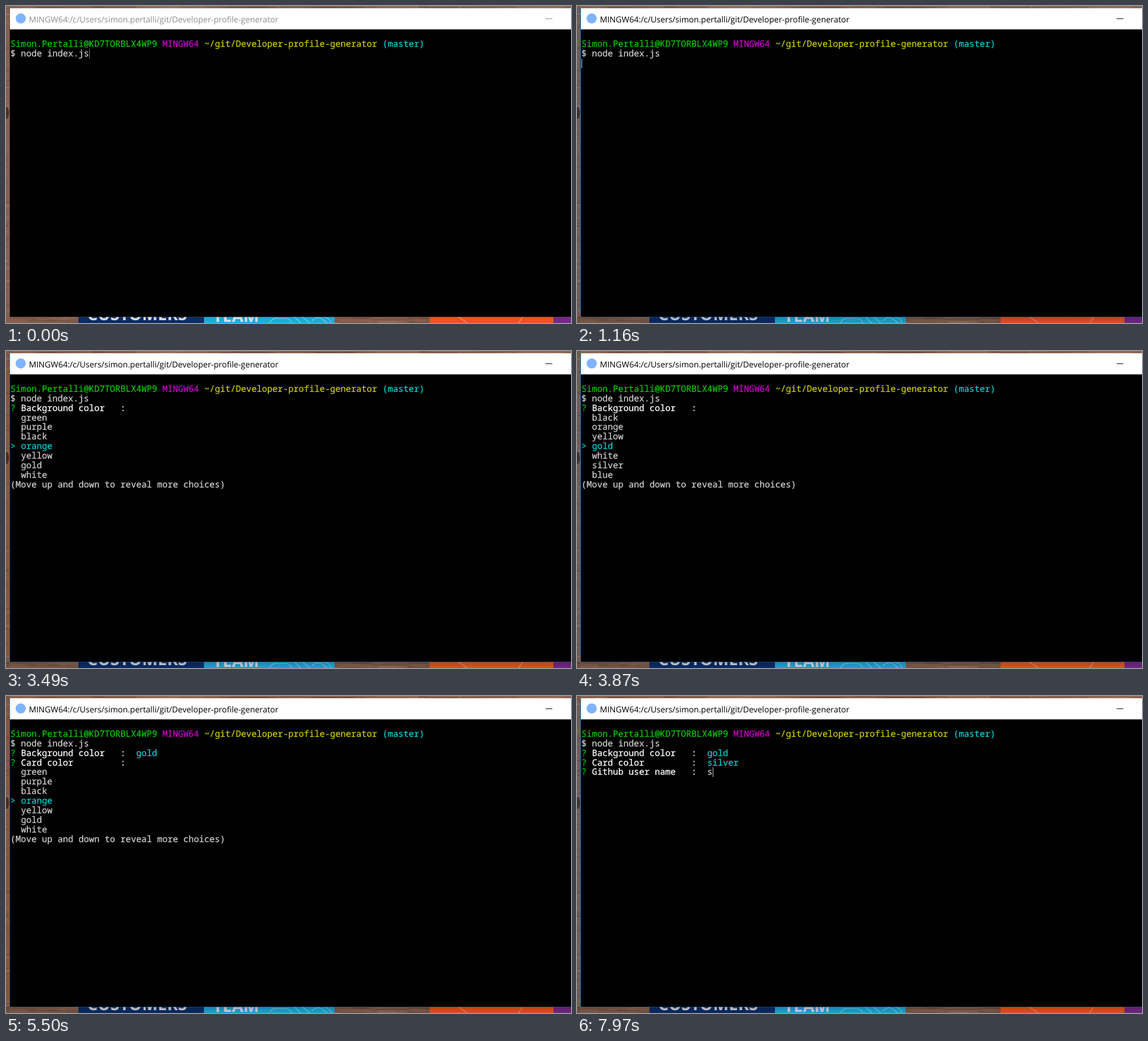
An HTML page for the animation above (8000 ms loop, 999 by 560 pixels).

```html
<!DOCTYPE html>
<html lang="en">
<head>
<meta charset="utf-8">
<title>Terminal session</title>
<style>
  html, body { margin: 0; width: 100%; height: 100%; overflow: hidden; background: #8a6250; }
  svg { display: block; width: 999px; height: 560px; }
  text { white-space: pre; text-rendering: geometricPrecision; }
  .title { font: 14.46px "Open Sans", sans-serif; }
  .poster { font: bold 29.4px "Open Sans", sans-serif; fill: #dfe6f6; }
  #screen { font: 15.44px "Noto Sans Mono", monospace; stroke-width: .3px; }
</style>
</head>
<body>
<svg viewBox="0 0 999 560">
  <defs>
    <linearGradient id="shade" x1="0" y1="0" x2="0" y2="1">
      <stop offset="0" stop-color="#000" stop-opacity=".24"/>
      <stop offset="1" stop-color="#000" stop-opacity=".1"/>
    </linearGradient>
  </defs>

  <rect width="999" height="560" fill="#8a6350"/>
  <g id="wood"></g>
  <ellipse cx="1" cy="189" rx="4" ry="11" fill="#2e1b14" opacity=".65"/>

  <g id="posters">
    <rect x="128" y="540" width="222" height="20" fill="#0b2f6e"/>
    <rect x="350" y="540" width="231" height="20" fill="#22b0e6"/>
    <rect x="749" y="540" width="219" height="20" fill="#f15a22"/>
    <rect x="968" y="540" width="31" height="20" fill="#7b2a90"/>
    <text class="poster" x="143.500" y="555">CUSTOMERS</text>
    <text class="poster" x="366" y="557.500">TEAM</text>
    <g fill="none" stroke="#8fd8f4" stroke-width="1.1">
      <path d="M466 560q4-9 13-8h16q8 1 10 8M510 549l11 11M524 549l13 11M541 556q9-9 18-3l9 7M560 549q12 1 15 11"/>
    </g>
    <g fill="none" stroke="#f58a5e" stroke-width="2">
      <path d="M799 549q8 5 17 11M906 560q5-7 8-11"/>
    </g>
  </g>
  <g id="shadow">
    <rect y="549" width="999" height="11" fill="url(#shade)"/>
    <rect width="6" height="560" fill="#000" opacity=".1"/>
  </g>

  <rect id="frame" x="6" y="4" width="1000" height="545.5"/>
  <rect x="7" y="41" width="992" height="508"/>
  <rect x="7" y="4" width="992" height="37.3" fill="#fff"/>
  <circle cx="26" cy="22" r="9" fill="#80b3ff"/>
  <g id="caption">
    <text class="title" x="40.5" y="28.5">MINGW64:/c/Users/simon.pertalli/git/Developer-profile-generator</text>
    <rect x="954" y="22" width="12" height="1"/>
  </g>

  <g id="screen"></g>
  <path id="pointer" d="M0 .5h4q1 0 1 1.500q0-1.500 1-1.500h4M5 2v17M0 20.500h4q1 0 1-1.500q0 1.500 1 1.500h4"
        fill="none" stroke="#fff"/>
</svg>

<script>
const LOOP = 8000, CELL = 9.266, LINE = 16.87, LEFT = 7.85, TOP = 59;
const FOCUS_AT = 530, ENTER_AT = 1160;
const ink = {
  green: '#00c800', magenta: '#c800c8', yellow: '#c8c800', cyan: '#00cccc',
  gray: '#cccccc', white: '#fff', dim: '#808080'
};
const colors = 'blue red green purple black orange yellow gold white silver'.split(' ');

// The first time opens a list, each later one moves down, "end" confirms.
const lists = [
  { label: 'Background color', keys: [1620, 2630, 2860, 3010, 3240, 3490, 3640, 3870], end: 4250 },
  { label: 'Card color', keys: [4250, 4730, 4960, 5110, 5340, 5500, 5720, 5970, 6430, 6730], end: 7040 }
];
const input = { label: 'Github user name', at: 7040, blink: 7590, type: 7970 };
const path = [[230, 617, 343], [300, 596, 322], [530, 596, 322], [610, 560, 290],
              [690, 508, 245], [770, 464, 206], [850, 445, 189]];

const $ = id => document.getElementById(id);

function put(row, col, str, color) {
  const x = LEFT + col * CELL, y = Math.round(TOP + 13 + row * LINE), c = ink[color];
  return `<text x="${x.toFixed(2)}" y="${y}" fill="${c}" stroke="${c}">${str.replace('>', '&gt;')}</text>`;
}

function caret(row, col, color = 'gray') {
  const x = Math.round(LEFT + col * CELL), y = Math.round(TOP + row * LINE);
  return `<rect x="${x}" y="${y}" width="1" height="17" fill="${ink[color]}"/>`;
}

const question = (row, label) =>
  put(row, 0, '?', 'green') + put(row, 2, label.padEnd(19) + ':', 'white');

function menu(row, pick) {
  const first = Math.max(0, pick - 3);
  let out = '';
  for (let i = 0; i < 7; i++) {
    const n = first + i, on = n === pick;
    if (on) out += put(row + i, 0, '>', 'cyan');
    out += put(row + i, 2, colors[n % colors.length], on ? 'cyan' : 'gray');
  }
  return out + put(row + 7, 0, '(Move up and down to reveal more choices)', 'gray');
}

function screen(t) {
  let out = put(0, 0, 'Simon.Pertalli@KD7TORBLX4WP9', 'green') + put(0, 29, 'MINGW64', 'magenta') +
    put(0, 37, '~/git/Developer-profile-generator', 'yellow') + put(0, 71, '(master)', 'cyan') +
    put(1, 0, '$ node index.js', 'gray');
  if (t < ENTER_AT) return out + caret(1, 15, t < FOCUS_AT ? 'dim' : 'gray');
  if (t < lists[0].keys[0]) return out + caret(2, 0);

  let row = 2;
  for (const { label, keys, end } of lists) {
    if (t < keys[0]) break;
    const pick = keys.filter(k => k <= t).length - 1;
    out += question(row, label);
    if (t >= end) out += put(row, 24, colors[pick], 'cyan');
    else {
      if (pick === 0) out += put(row, 24, '(Use arrow keys)', 'dim');
      out += menu(row + 1, pick);
    }
    row++;
  }
  if (t >= input.at) {
    out += question(row, input.label);
    if (t >= input.type) out += put(row, 24, 's', 'gray') + caret(row, 25);
    else if (t < input.blink) out += caret(row, 24);
  }
  return out;
}

function grain() {
  let seed = 7, out = '';
  const rnd = () => (seed = seed * 16807 % 2147483647) / 2147483647;
  const streak = (x, y, w) => {
    out += `<rect x="${x}" y="${y}" width="${w}" height="${1 + rnd() * 2}"
      fill="${rnd() < .5 ? '#5d3d30' : '#a8836d'}" opacity="${.1 + rnd() * .3}"/>`;
  };
  for (let i = 0; i < 110; i++) streak(0, rnd() * 560, 3 + rnd() * 5);
  for (let i = 0; i < 45; i++) streak(rnd() * 960, rnd() * 3, 20 + rnd() * 80);
  for (let i = 0; i < 70; i++) streak(rnd() * 960, 549 + rnd() * 10, 15 + rnd() * 60);
  return out;
}

let shown = '';
function draw(t) {
  const next = screen(t);
  if (next !== shown) $('screen').innerHTML = shown = next;

  const focused = t >= FOCUS_AT;
  $('caption').setAttribute('fill', focused ? '#000' : '#8f8f8f');
  $('frame').setAttribute('fill', focused ? '#1a68a6' : '#5c4a42');
  $('shadow').setAttribute('opacity', focused ? 1 : .25);

  const spot = path.filter(p => p[0] <= t).pop();
  const visible = spot && t < ENTER_AT;
  $('pointer').setAttribute('visibility', visible ? 'visible' : 'hidden');
  if (visible) $('pointer').setAttribute('transform', `translate(${spot[1]} ${spot[2]})`);
}

$('wood').innerHTML = grain();
const start = performance.now();
function tick() {
  draw((performance.now() - start) % LOOP);
  requestAnimationFrame(tick);
}
tick();
</script>
</body>
</html>
```
